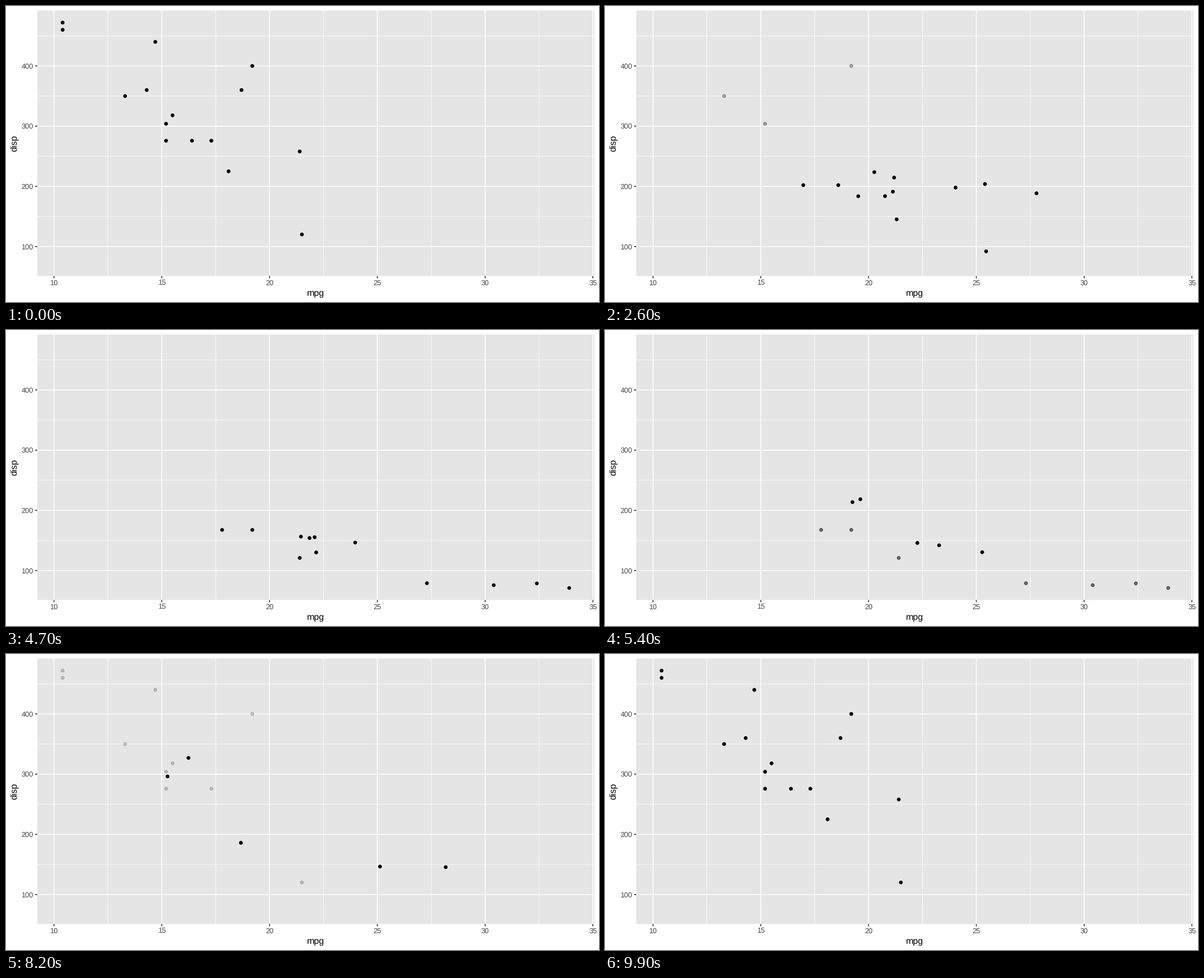
Animation of 1058 by 529 pixels, one loop 10000 ms. Source, as a matplotlib script:

```python
from itertools import chain

import matplotlib.pyplot as plt
from matplotlib.animation import FuncAnimation
from matplotlib.patches import Circle, Rectangle

W, H, DPI = 1058, 529, 64
PT = 72 / DPI  # points per pixel
LEFT, RIGHT, TOP, BOTTOM = 55.8, 1050, 8.1, 482.6
TICK, GAP = 4, 3.2
GRID, DARK, GREY = 1.55, "#2b2b2b", "#434343"
FRAMES, HOLD, TRAVEL = 100, 12, 22


def level(disp, *mpgs):
    """Cars that share one displacement."""
    return [(mpg, disp) for mpg in mpgs]


# (mpg, disp) of the cars with three, four and five gears
THREE = [(21.4, 258), (18.7, 360), (18.1, 225), (14.3, 360),
         *level(275.8, 16.4, 17.3, 15.2), (10.4, 472), (10.4, 460),
         (14.7, 440), (21.5, 120.1), (15.5, 318), (15.2, 304), (13.3, 350),
         (19.2, 400)]
FOUR = [*level(160, 21, 21), (22.8, 108), (24.4, 146.7), (22.8, 140.8),
        *level(167.6, 19.2, 17.8), (32.4, 78.7), (30.4, 75.7), (33.9, 71.1),
        (27.3, 79), (21.4, 121)]
FIVE = [(26, 120.3), (30.4, 95.1), (15.8, 351), (19.7, 145), (15, 301)]
GEARS = [THREE, FOUR, FIVE]


def scale(values, start, end):
    """Map the data range, widened by 5% on both sides, to pixels."""
    values = list(values)
    pad = 0.05 * (max(values) - min(values))
    low, high = min(values) - pad, max(values) + pad
    return lambda v: start + (v - low) / (high - low) * (end - start)


px = scale((p[0] for p in chain(*GEARS)), LEFT, RIGHT)
py = scale((p[1] for p in chain(*GEARS)), BOTTOM, TOP)

plt.rcParams.update({"font.family": "Liberation Sans", "text.hinting": "none"})
fig = plt.figure(figsize=(W / DPI, H / DPI), dpi=DPI, facecolor="white")
ax = fig.add_axes([0, 0, 1, 1])
ax.set_xlim(0, W)
ax.set_ylim(H, 0)
ax.axis("off")


def line(xs, ys, width=GRID, color="white", z=3):
    ax.plot(xs, ys, color=color, lw=width * PT, zorder=z, snap=False,
            solid_capstyle="butt")


def label(x, y, text, size=12.8, color=GREY, ha="center", **kw):
    ax.text(x, y, text, fontsize=size * PT, color=color, ha=ha,
            va="baseline", **kw)


def grid_x(v, **kw):
    line([px(v)] * 2, [TOP, BOTTOM], **kw)


def grid_y(v, **kw):
    line([LEFT, RIGHT], [py(v)] * 2, **kw)


ax.add_patch(Rectangle((LEFT, TOP), RIGHT - LEFT, BOTTOM - TOP,
                       fc="#e5e5e5", ec="none", zorder=1, snap=False))

for v in range(10, 36, 5):
    grid_x(v)
    if v < 35:
        grid_x(v + 2.5, width=GRID / 2, z=2)
    line([px(v)] * 2, [BOTTOM, BOTTOM + TICK], color=DARK)
    label(px(v), BOTTOM + TICK + GAP + 9.2, str(v))

for v in range(100, 401, 100):
    grid_y(v)
    grid_y(v + 50, width=GRID / 2, z=2)
    line([LEFT - TICK, LEFT], [py(v)] * 2, color=DARK)
    label(LEFT - TICK - GAP, py(v) + 4.6, str(v), ha="right")

label((LEFT + RIGHT) / 2, 517.2, "mpg", 16, "black")
label(19.4, (TOP + BOTTOM) / 2, "disp", 16, "black",
      rotation=90, rotation_mode="anchor")

dots = [ax.add_patch(Circle((0, 0), 2.84, fc="black", ec="black",
                            lw=1.03 * PT, zorder=4, snap=False))
        for _ in THREE]


def pose(step):
    """Points as (mpg, disp, alpha): paired ones travel, the rest fade."""
    k, local = divmod(step, HOLD + TRAVEL)
    a, b = GEARS[k], GEARS[(k + 1) % len(GEARS)]
    first = HOLD - 1
    last = min(first + TRAVEL, FRAMES - k * (HOLD + TRAVEL))
    t = min(1, max(0, (local - first) / (last - first)))
    n = min(len(a), len(b))
    leaving = [(x, y, 1 - t) for x, y in a[n:]]
    entering = [(x, y, t) for x, y in b[n:]]
    moving = [(x0 + (x1 - x0) * t, y0 + (y1 - y0) * t, 1)
              for (x0, y0), (x1, y1) in zip(a, b)]
    return leaving + entering + moving


def draw(i):
    # 101 steps are spread over 100 frames, so one is skipped midway
    points = pose(i + (i >= FRAMES // 2))
    for dot in dots:
        dot.set_visible(False)
    for dot, (x, y, alpha) in zip(dots, points):
        dot.set_center((px(x), py(y)))
        dot.set_alpha(alpha)
        dot.set_visible(True)
    return dots


anim = FuncAnimation(fig, draw, frames=FRAMES, interval=100, repeat=True,
                     repeat_delay=0, blit=False)
plt.show()
```
